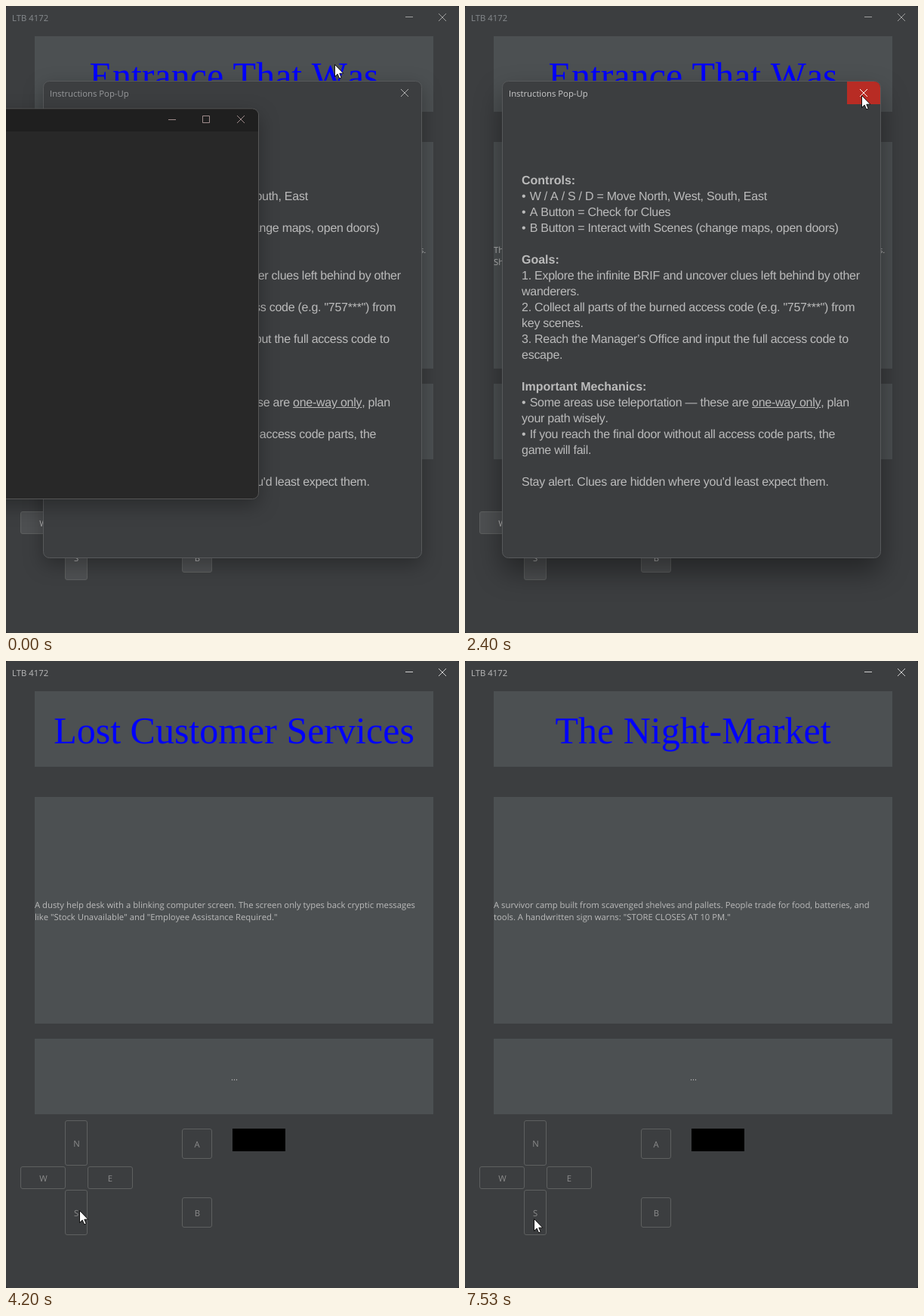
An HTML page for the animation above (8000 ms loop, 600 by 830 pixels).

```html
<!DOCTYPE html>
<html lang="en">
<head>
<meta charset="utf-8">
<title>Text adventure</title>
<style>
  html, body { margin: 0; width: 100%; height: 100%; overflow: hidden; background: #2a2b2d; }
  svg { display: block; width: 600px; height: 830px; font-kerning: none; }
  text { font: 11.3px "Open Sans", "Noto Sans", sans-serif; font-kerning: none; fill: #bbb; text-rendering: geometricPrecision; }
  .mid { text-anchor: middle; }
  .heading { font: 50px "Liberation Serif", serif; font-kerning: none; fill: #00f; text-anchor: middle; }
  .panel { fill: #4c5052; }
  .icon { fill: none; stroke: #c8c8c8; }

  /* One 15 fps clock of 120 ticks; every change is a hard step. */
  .caption, .ctl, .popup, .popBody, .popCaption, .popX, .popRed, .win, .winIcons, .winRed, .winX, .winBody,
  .scene, .btn rect, .btn text, .stamina, .staminaText, .cursor {
    animation: 8s step-end -4ms infinite;
  }

  .caption { animation-name: caption; }
  @keyframes caption { 0% { fill: #878b8e; } 31.667% { fill: #bbb; } }
  .ctl { animation-name: ctl; }
  @keyframes ctl { 0% { stroke: #a0a0a0; } 31.667% { stroke: #d0d0d0; } }

  .scene1 { animation-name: scene1; }
  .scene2 { animation-name: scene2; }
  .scene3 { animation-name: scene3; }
  .dots { animation-name: dots; }
  @keyframes scene1 { 0% { opacity: 1; } 46.667% { opacity: 0; } }
  @keyframes scene2 { 0% { opacity: 0; } 46.667% { opacity: 1; } 94.167% { opacity: 0; } }
  @keyframes scene3 { 0% { opacity: 0; } 94.167% { opacity: 1; } }
  @keyframes dots { 0% { opacity: 0; } 46.667% { opacity: 1; } }

  .btn rect { fill: #4e5052; stroke: #5e6060; animation-name: btn; }
  .btn text { text-anchor: middle; animation-name: label; }
  .btn.e rect { animation-name: east; }
  .btn.s rect { animation-name: south; }
  @keyframes btn {
    0%, 84.167% { fill: #4e5052; }
    46.667%, 94.167% { fill: #3c3e40; }
  }
  @keyframes label {
    0%, 84.167% { fill: #bbb; }
    46.667%, 94.167% { fill: #8c8c8c; }
  }
  @keyframes east {
    0%, 84.167% { fill: #4e5052; stroke: #5e6060; }
    37.5% { fill: #55585a; stroke: #5e6060; }
    42.5% { fill: #5b5e60; stroke: #466d94; }
    46.667%, 94.167% { fill: #3c3e40; stroke: #5e6060; }
  }
  @keyframes south {
    0%, 84.167% { fill: #4e5052; stroke: #5e6060; }
    87.5% { fill: #5b5e60; stroke: #466d94; }
    46.667%, 94.167% { fill: #3c3e40; stroke: #5e6060; }
  }
  .stamina { animation-name: stamina; }
  @keyframes stamina {
    0%, 84.167% { fill: #286ee6; }
    46.667%, 94.167% { fill: #000; }
  }
  .staminaText { animation-name: staminaText; }
  @keyframes staminaText {
    0%, 84.167% { fill: #f0f0f0; }
    46.667%, 94.167% { fill: #000; }
  }

  svg {
    --idle: drop-shadow(0 9px 13px rgba(0, 0, 0, .3));
    --active: drop-shadow(0 18px 18px rgba(0, 0, 0, .4));
  }
  .popup { animation-name: popup; }
  @keyframes popup { 0% { opacity: 1; } 31.667% { opacity: 0; } }
  .popBody { fill: #3c3e40; stroke: #57595b; animation-name: popBody; }
  @keyframes popBody { 0% { filter: var(--idle); } 30% { filter: var(--active); } }
  .popCaption { animation-name: popCaption; }
  @keyframes popCaption { 0% { fill: #989a9c; } 30% { fill: #ccc; } }
  .popX { animation-name: popX; }
  @keyframes popX { 0% { stroke: #b0b0b0; } 20% { stroke: #fff; } }
  .popRed { animation-name: popRed; }
  @keyframes popRed {
    0% { fill: #c42b1c; opacity: 0; }
    20% { fill: #c42b1c; opacity: 1; }
    30% { fill: #b82c24; opacity: 1; }
  }
  .rules {
    font: 16px/21px "Liberation Sans", Arial, sans-serif; font-kerning: none;
    letter-spacing: -.26px; white-space: pre; color: #bbb;
    text-rendering: geometricPrecision;
  }
  .rules b { letter-spacing: 0; }
  .rules i { font-style: normal; letter-spacing: .3px; }

  .win { transform-origin: -180px 394px; animation-name: win; }
  @keyframes win {
    0% { opacity: 1; transform: none; }
    7.5% { opacity: .86; transform: scale(.9942); }
    8.333% { opacity: .4; transform: scale(.978); }
    9.167% { opacity: .1; transform: scale(.965); }
    10% { opacity: 0; transform: scale(.96); }
  }
  .winBody { fill: #282828; stroke: #565656; animation-name: winBody; }
  @keyframes winBody { 0% { filter: var(--idle); } 5.833% { filter: var(--active); } }
  .winIcons { animation-name: winIcons; }
  @keyframes winIcons { 0% { stroke: #a08c8c; } 5.833% { stroke: #ddd; } }
  .winX { animation-name: winX; }
  @keyframes winX { 0% { stroke: #a08c8c; } 3.333% { stroke: #e4e4e4; } }
  .winRed { fill: #c42b1c; animation-name: winRed; }
  @keyframes winRed { 0%, 7.5% { opacity: 0; } 3.333% { opacity: 1; } }

  .cursor { animation-name: cursor; }
  @keyframes cursor {
    /* to the front window's close button */
    0% { transform: translate(435px, 77px); }
    .833% { transform: translate(424px, 84px); }
    1.667% { transform: translate(394px, 104px); }
    2.5% { transform: translate(356px, 130px); }
    3.333% { transform: translate(330px, 143px); }
    4.167% { transform: translate(322px, 145px); }
    /* right, then up to the pop-up's close button */
    9.167% { transform: translate(340px, 146px); }
    10% { transform: translate(385px, 148px); }
    10.833% { transform: translate(440px, 150px); }
    11.667% { transform: translate(494px, 153px); }
    12.5% { transform: translate(530px, 155px); }
    13.333% { transform: translate(544px, 156px); }
    14.167% { transform: translate(546px, 156px); }
    16.667% { transform: translate(545px, 157px); }
    17.5% { transform: translate(544px, 161px); }
    18.333% { transform: translate(540px, 156px); }
    19.167% { transform: translate(533px, 139px); }
    20% { transform: translate(527px, 124px); }
    20.833% { transform: translate(525px, 118px); }
    /* down to E */
    33.333% { transform: translate(515px, 135px); }
    34.167% { transform: translate(460px, 220px); }
    35% { transform: translate(370px, 350px); }
    35.833% { transform: translate(265px, 500px); }
    36.667% { transform: translate(190px, 610px); }
    37.5% { transform: translate(152px, 665px); }
    38.333% { transform: translate(143px, 677px); }
    /* over to S */
    48.333% { transform: translate(151px, 680px); }
    49.167% { transform: translate(155px, 690px); }
    50% { transform: translate(140px, 705px); }
    50.833% { transform: translate(118px, 718px); }
    51.667% { transform: translate(103px, 726px); }
    52.5% { transform: translate(97px, 727px); }
    55.833% { transform: translate(96px, 728px); }
    62.5% { transform: translate(97px, 730px); }
    63.333% { transform: translate(98px, 735px); }
    64.167% { transform: translate(99px, 738px); }
    73.333% { transform: translate(91px, 738px); }
  }
</style>
</head>
<body>
<svg viewBox="0 0 600 830">
  <defs>
    <path id="x" d="M-5 -5L5 5M5 -5L-5 5"/>
  </defs>

  <!-- main window -->
  <rect width="600" height="830" rx="4" fill="#3c3e40"/>
  <text class="caption" x="8" y="20">LTB 4172</text>
  <path class="icon ctl" d="M529 14.5H539"/>
  <use class="icon ctl" href="#x" x="578" y="15"/>
  <rect class="panel" x="38" y="40" width="528" height="100"/>
  <rect class="panel" x="38" y="180" width="528" height="300"/>
  <rect class="panel" x="38" y="500" width="528" height="100"/>

  <g class="scene scene1">
    <text class="heading" x="302" y="109">Entrance That Was</text>
    <text y="327"><tspan x="38">The spot where new wanderers arrive. The sliding glass doors are gone, replaced by endless aisles.</tspan><tspan x="38" dy="16">Shopping carts and discarded bags suggest others came before you.</tspan></text>
  </g>
  <g class="scene scene2">
    <text class="heading" x="302" y="109">Lost Customer Services</text>
    <text y="327"><tspan x="38">A dusty help desk with a blinking computer screen. The screen only types back cryptic messages</tspan><tspan x="38" dy="16">like "Stock Unavailable" and "Employee Assistance Required."</tspan></text>
  </g>
  <g class="scene scene3">
    <text class="heading" x="302" y="109">The Night-Market</text>
    <text y="327"><tspan x="38">A survivor camp built from scavenged shelves and pallets. People trade for food, batteries, and</tspan><tspan x="38" dy="16">tools. A handwritten sign warns: "STORE CLOSES AT 10 PM."</tspan></text>
  </g>
  <text class="scene dots mid" x="302.5" y="555">...</text>

  <g class="btn"><rect x="78.5" y="608.5" width="29" height="59" rx="2.5"/><text x="93.5" y="643">N</text></g>
  <g class="btn"><rect x="19.5" y="669.5" width="59" height="29" rx="2.5"/><text x="49.5" y="689">W</text></g>
  <g class="btn e"><rect x="108.5" y="669.5" width="59" height="29" rx="2.5"/><text x="138" y="689">E</text></g>
  <g class="btn s"><rect x="78.5" y="700.5" width="29" height="59" rx="2.5"/><text x="93" y="735">S</text></g>
  <g class="btn"><rect x="233.5" y="619.5" width="39" height="39" rx="2.5"/><text x="253" y="644">A</text></g>
  <g class="btn"><rect x="233.5" y="710.5" width="39" height="39" rx="2.5"/><text x="253.5" y="735">B</text></g>
  <rect class="stamina" x="300" y="619" width="70" height="30"/>
  <text class="staminaText mid" x="335.5" y="639">Stamina</text>

  <!-- instructions -->
  <g class="popup">
    <rect class="popBody" x="49.5" y="99.5" width="501" height="631" rx="8"/>
    <path class="popRed" d="M506 100H542a8 8 0 0 1 8 8V130H506Z"/>
    <text class="popCaption" x="58" y="120">Instructions Pop-Up</text>
    <use class="icon popX" href="#x" x="528" y="115"/>
    <foreignObject x="75" y="221" width="470" height="430"><div class="rules"><b>Controls:</b>
<i>• </i>W / A / S / D = Move North, West, South, East
<i>• </i>A Button = Check for Clues
<i>• </i>B Button = Interact with Scenes (change maps, open doors)

<b>Goals:</b>
1. Explore the infinite BRIF and uncover clues left behind by other
wanderers.
2. Collect all parts of the burned access code (e.g. "757***") from
key scenes.
3. Reach the Manager’s Office and input the full access code to
escape.

<b>Important Mechanics:</b>
<i>• </i>Some areas use teleportation — these are <u>one-way only</u>, plan
your path wisely.
<i>• </i>If you reach the final door without all access code parts, the
game will fail.

Stay alert. Clues are hidden where you'd least expect them.</div></foreignObject>
  </g>

  <!-- dark window in front -->
  <g class="win">
    <rect class="winBody" x="-694.5" y="136" width="1029" height="516.5" rx="8"/>
    <path fill="#1f1f1f" d="M-686 136.5H326a8 8 0 0 1 8 8V166H-694V144Z"/>
    <path class="winRed" d="M289 136.5H326a8 8 0 0 1 8 8V166H289Z"/>
    <path class="icon winIcons" d="M215 150.5H225M260.5 145.5h9v9h-9Z"/>
    <use class="icon winX" href="#x" x="311" y="150"/>
  </g>

  <path class="cursor" fill="#fff" stroke="#000" stroke-width=".9" stroke-linejoin="round"
        d="M.5 .5V16.6L4.2 13.1L6.7 18.9L9.2 17.8L6.8 12.2H11.8Z"/>
</svg>
</body>
</html>
```
